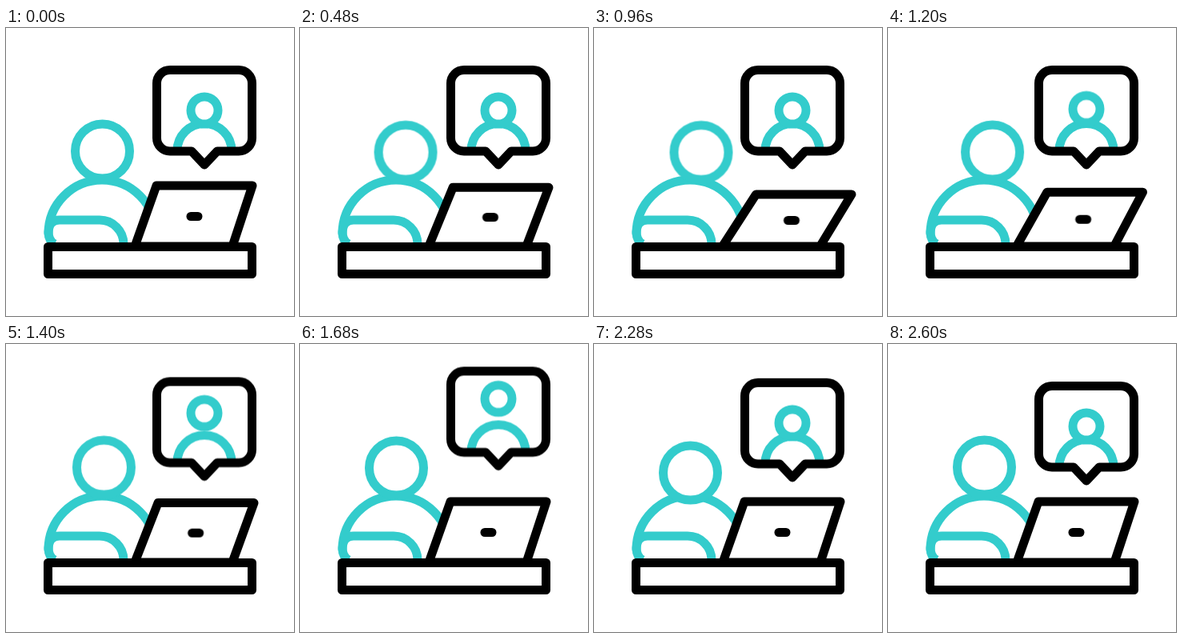
An HTML page without scripts for the animation above (2720 ms loop, 360 by 360 pixels).

```html
<!DOCTYPE html>
<html lang="en">
<head>
<meta charset="utf-8">
<title>Video call</title>
<style>
  html, body { margin: 0; width: 100%; height: 100%; overflow: hidden; background: #fff; }
  svg { display: block; width: 100%; height: 100%; }

  .line { fill: none; stroke: #000; stroke-width: 11; stroke-linecap: round; stroke-linejoin: round; }
  .teal { stroke: #33cccc; }
  .flat { stroke-linecap: butt; }
  .solid { fill: #fff; }

  .head, .screen, .camera, .bubble, .caller {
    animation: 2720ms cubic-bezier(.37, 0, .63, 1) infinite;
  }
  .head { animation-name: lean-and-nod; }
  .screen { animation-name: tilt; }
  .camera { animation-name: follow-tilt; }
  .bubble { animation-name: rise; }
  .caller { animation-name: stretch; }

  @keyframes lean-and-nod {
    0%, 4.41%, 55.88%, 58.82%, 93.4%, 100% { transform: translate(0, 0); }
    22.06%, 38.24% { transform: translate(13.5px, 1.5px); }
    75%, 77.2% { transform: translate(0, 11px); }
  }
  @keyframes tilt {
    0%, 12.5%, 55.88%, 100% { d: path("M161 273 L188 197 L308 197 L283 273 Z"); }
    29.41%, 38.24% { d: path("M160.5 273 L202.5 208 L322 208 L282.5 273 Z"); }
  }
  @keyframes follow-tilt {
    0%, 12.5%, 55.88%, 100% { transform: translate(0, 0); }
    29.41%, 38.24% { transform: translate(11.5px, 5px); }
  }
  @keyframes rise {
    0%, 44.12%, 90%, 100% { transform: translateY(0); }
    64.71%, 70% { transform: translateY(-19.5px); }
  }
  @keyframes stretch {
    0%, 40.44%, 84.56%, 100% { transform: translateY(0); }
    58.09%, 66.91% { transform: translateY(-16px); }
  }
</style>
</head>
<body>
<svg viewBox="0 0 360 360">
  <g class="line teal">
    <path d="M53 257 A67 67 0 0 1 187 257"/>
    <path class="flat" d="M61 270 Q53 266 53 255 Q54 240 67 240 H117 A30 30 0 0 1 147 270"/>
    <circle class="head solid" cx="120.5" cy="154" r="34"/>
  </g>

  <path class="line solid screen" d="M161 273 L188 197 L308 197 L283 273 Z"/>
  <path class="line camera" d="M231 235.5 H240"/>
  <rect class="line solid" x="52.5" y="273.5" width="255" height="34"/>

  <g class="bubble">
    <path class="line teal flat" d="M214 153.5 A34 34 0 0 1 282 153.5"/>
    <circle class="line teal solid caller" cx="248" cy="103" r="17"/>
    <path class="line" d="M205 52.5 H291 A16.5 16.5 0 0 1 307.5 69 V137.5 A16.5 16.5 0 0 1 291 154 H264 L248 171 L232 154 H205 A16.5 16.5 0 0 1 188.5 137.5 V69 A16.5 16.5 0 0 1 205 52.5 Z"/>
  </g>
</svg>
</body>
</html>
```
